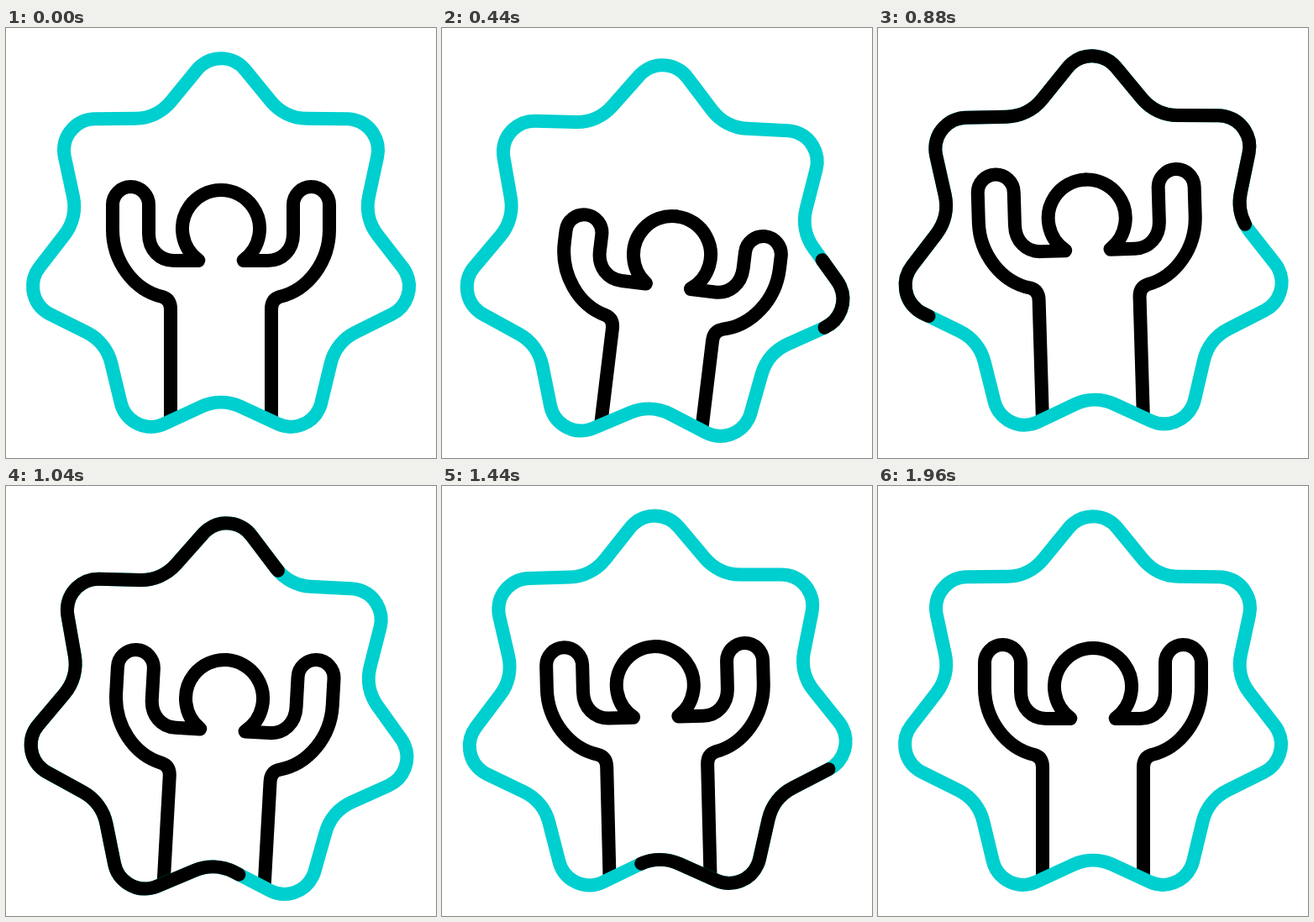
Recreate the animation shown at these times as an HTML page with a canvas. Size 512 px wide and 512 px high, loop 2320 ms.

```html
<!DOCTYPE html>
<html lang="en">
<head>
<meta charset="utf-8">
<title>Cheering figure in a star</title>
<style>
  html, body { margin: 0; width: 100%; height: 100%; overflow: hidden; background: #fff; }
  canvas { display: block; width: 512px; height: 512px; }
</style>
</head>
<body>
<canvas id="stage" width="512" height="512"></canvas>
<script>
const ctx = document.getElementById('stage').getContext('2d');
const LOOP = 2320, STEP = 40, END = 1960;
const CYAN = '#00cfcf', BLACK = '#000';

// time, star y, star turn, body x, body y, body turn, arm drop (turns in degrees)
const KEYS = [
  [0, 0, 0, 0, 0, 0, 0],
  [180, 9, 2.5, 7, 12, 3, 4],
  [340, 16, 4.5, 18, 33, 7.4, 14],
  [440, 8, 2.2, 18, 31, 6.9, 15],
  [560, -11, -1.7, 4, -1, 0.5, 8],
  [680, -20, -4.45, -12, -30, -6, -1.5],
  [770, -15, -3.4, -13, -31, -5.8, -4.5],
  [900, -1, 0, -6, -9, -1, -5],
  [1040, 8, 2.2, 4, 14, 3.2, -2],
  [1150, 7.5, 1.4, 7, 17, 2.7, 3],
  [1280, 2, -0.95, 5, 10, 0.5, 6],
  [1460, -0.8, -0.8, -3, -3, -1.6, 2],
  [1640, 0, -0.2, -8, -8, -2.1, -3],
  [1800, 0, 0, -4, -4, -1, -2],
  [1960, 0, 0, 0, 0, 0, 0]
];

// Star: tip arcs and valley arcs joined by tangent lines
const STEP_ANGLE = Math.PI / 7;
const TIP_R = 37.2, TIP_D = 191.6, VALLEY_R = 56;
const tipHalf = 50.7 * Math.PI / 180, valleyHalf = tipHalf - STEP_ANGLE;
const valleyD = (TIP_D * Math.cos(tipHalf) + TIP_R + VALLEY_R) / Math.cos(valleyHalf);
const side = TIP_D * Math.sin(tipHalf) - valleyD * Math.sin(valleyHalf);
const outline = 14 * (tipHalf * TIP_R + valleyHalf * VALLEY_R + side);

const star = new Path2D();
for (let i = 0; i < 7; i++) {
  const a = Math.PI / 14 - i * 2 * STEP_ANGLE, v = a - STEP_ANGLE;
  star.arc(TIP_D * Math.cos(a), TIP_D * Math.sin(a), TIP_R, a + tipHalf, a - tipHalf, true);
  star.arc(valleyD * Math.cos(v), valleyD * Math.sin(v), VALLEY_R,
    v + Math.PI - valleyHalf, v + Math.PI + valleyHalf);
}
star.closePath();

const slope = (i, c) => {
  const a = KEYS[i - 1], b = KEYS[i + 1];
  return a && b ? (b[c] - a[c]) / (b[0] - a[0]) : 0;
};

// Smooth cubic through the keys
function pose(t) {
  let i = 0;
  while (i < KEYS.length - 2 && t >= KEYS[i + 1][0]) i++;
  const a = KEYS[i], b = KEYS[i + 1], span = b[0] - a[0], u = (t - a[0]) / span;
  const w = u * u * (3 - 2 * u);
  return a.map((p, c) => p + (b[c] - p) * w
    + span * u * (1 - u) * ((1 - u) * slope(i, c) - u * slope(i + 1, c)));
}

function ease(t, from, to) {
  const u = Math.min(1, Math.max(0, (t - from) / (to - from)));
  return (1 - Math.cos(Math.PI * u)) / 2;
}

function place(x, y, degrees) {
  ctx.translate(x, y);
  ctx.rotate(degrees * Math.PI / 180);
}

// Left half of the figure, with the head centre at the origin
function halfBody(drop) {
  const hand = drop - 28.5;
  ctx.beginPath();
  ctx.moveTo(-60, 320);
  ctx.lineTo(-60, 96);
  ctx.quadraticCurveTo(-60, 84, -70, 81);
  ctx.bezierCurveTo(-104, 73, -129, 39, -129, 1);
  ctx.arc(-107.5, hand, 21.5, Math.PI, 0);
  ctx.lineTo(-86, 6);
  ctx.bezierCurveTo(-86, 25, -73, 38, -56, 38);
  ctx.lineTo(-27, 38);
  ctx.arc(0, 0, 46, 2.19, 1.5 * Math.PI);
  ctx.stroke();
}

function draw(t) {
  const [, starY, starTurn, x, y, turn, drop] = pose(t);
  const placeStar = () => place(256 - starY / 10, 265 + starY, starTurn);
  ctx.fillStyle = '#fff';
  ctx.fillRect(0, 0, 512, 512);
  ctx.lineWidth = 16;
  ctx.lineCap = ctx.lineJoin = 'round';

  ctx.save();
  ctx.save();
  placeStar();
  const inside = ctx.getTransform();
  ctx.restore();
  const clip = new Path2D();
  clip.addPath(star, inside);
  ctx.clip(clip);
  place(256 + x, 239 + y, turn);
  ctx.strokeStyle = BLACK;
  halfBody(drop);
  ctx.scale(-1, 1);
  halfBody(drop);
  ctx.restore();

  ctx.save();
  placeStar();
  ctx.strokeStyle = CYAN;
  ctx.stroke(star);
  const head = ease(t, 265, 1330), tail = ease(t, 675, 1770);
  if (head - tail > 0.0005) {
    ctx.strokeStyle = BLACK;
    ctx.setLineDash([(head - tail) * outline, 2 * outline]);
    ctx.lineDashOffset = -tail * outline;
    ctx.stroke(star);
  }
  ctx.restore();
}

const start = performance.now();
function tick() {
  const t = (performance.now() - start) % LOOP;
  draw(Math.min(END, Math.floor(t / STEP) * STEP));
  requestAnimationFrame(tick);
}
tick();
</script>
</body>
</html>
```
